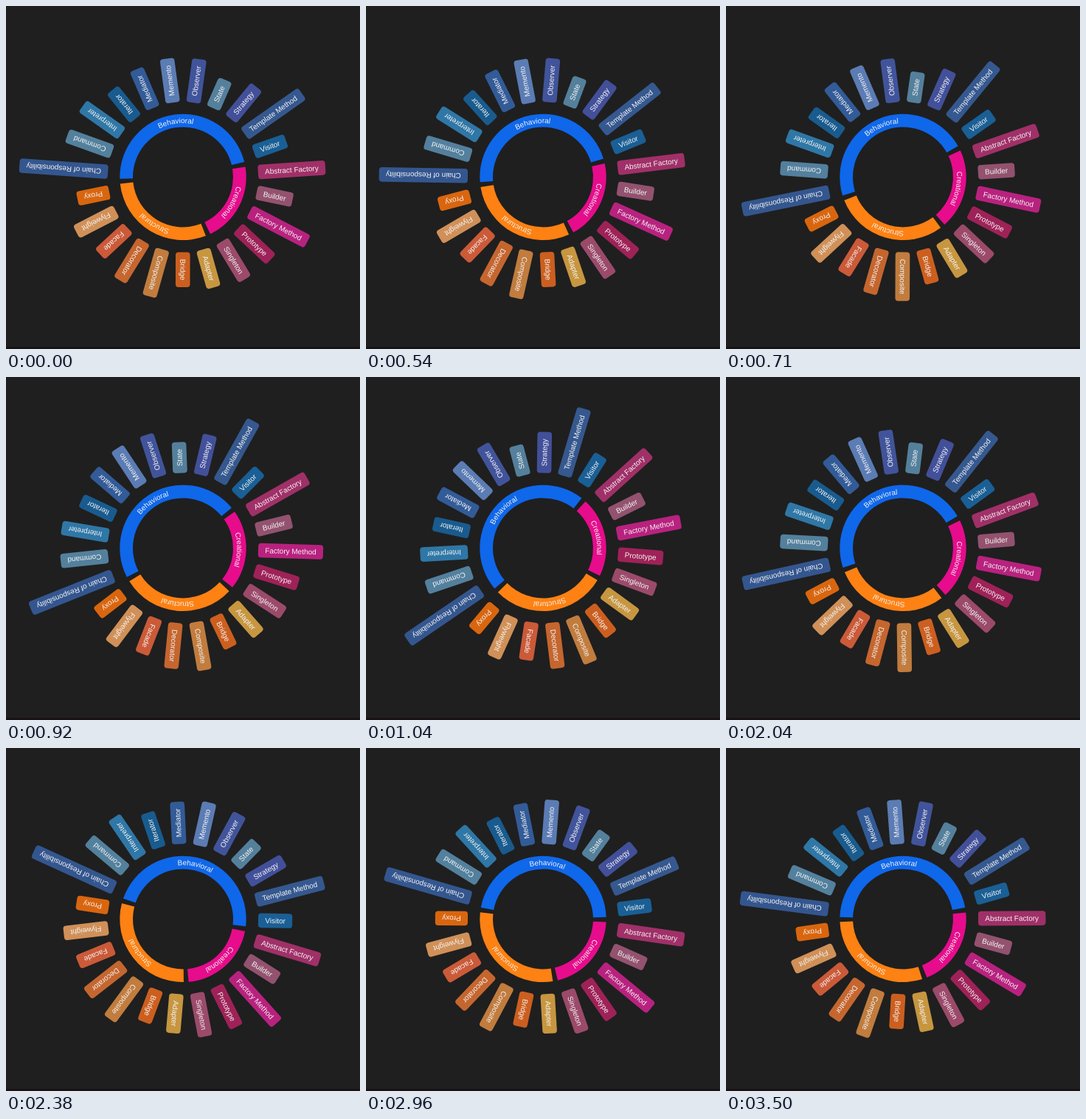
An HTML page for the animation above (4.18 s loop, 480x466 px).

```html
<!DOCTYPE html>
<html lang="en">
<head>
<meta charset="utf-8">
<title>Design pattern wheel</title>
<style>
  html, body { margin: 0; width: 100%; height: 100%; overflow: hidden; background: #1f1f1f; }
  svg { display: block; width: 480px; height: 466px; }
  text { font: 10px "Liberation Sans", Arial, sans-serif; fill: #f4f4f4; }
</style>
</head>
<body>
<svg viewBox="0 0 480 466">
  <rect width="480" height="466" fill="#1f1f1f"/>
  <rect y="463" width="480" height="3" fill="#191315"/>
  <g id="wheel"></g>
</svg>
<script>
const LOOP = 4180;
const CENTER = { x: 240, y: 232.4 };
const RING = { inner: 68, outer: 85.7, label: 73.3, gap: 4.5 };
const CARD = { start: 102, height: 19.6, padding: 9.3, radius: 4 };

const groups = [
  { name: 'Creational', color: '#e60c8c', items: [
    ['Abstract Factory', '#a03068'], ['Builder', '#93526f'], ['Factory Method', '#b8227f'],
    ['Prototype', '#9e2258'], ['Singleton', '#9b4a6a']] },
  { name: 'Structural', color: '#fd8113', items: [
    ['Adapter', '#c79640'], ['Bridge', '#cc5f1f'], ['Composite', '#c17c3e'], ['Decorator', '#c5662f'],
    ['Facade', '#cb5a38'], ['Flyweight', '#d09058'], ['Proxy', '#d9660f']] },
  { name: 'Behavioral', color: '#0f67ea', items: [
    ['Chain of Responsibility', '#34568f'], ['Command', '#53809d'], ['Interpreter', '#2f77a6'],
    ['Iterator', '#195b8e'], ['Mediator', '#325b98'], ['Memento', '#5b7cb4'], ['Observer', '#41549b'],
    ['State', '#54809c'], ['Strategy', '#42509a'], ['Template Method', '#35588f'], ['Visitor', '#1a5f95']] }
];

const wheel = document.getElementById('wheel');
const count = groups.reduce((sum, group) => sum + group.items.length, 0);
const slot = 360 / count;

function add(parent, tag, attrs, content) {
  const node = document.createElementNS('http://www.w3.org/2000/svg', tag);
  for (const key in attrs) node.setAttribute(key, attrs[key]);
  if (content) node.textContent = content;
  return parent.appendChild(node);
}

function polar(radius, degrees) {
  const a = degrees * Math.PI / 180;
  return `${(radius * Math.cos(a)).toFixed(3)} ${(radius * Math.sin(a)).toFixed(3)}`;
}

function arc(radius, from, to) {
  return `${polar(radius, from)}A${radius} ${radius} 0 0 ${to > from ? 1 : 0} ${polar(radius, to)}`;
}

function addSegment(group, from, to) {
  const a = from + RING.gap / 2, b = to - RING.gap / 2;
  add(wheel, 'path', {
    d: `M${arc(RING.outer, a, b)}L${arc(RING.inner, b, a)}Z`, fill: group.color
  });
  const id = 'arc-' + group.name;
  add(wheel, 'path', { id, d: 'M' + arc(RING.label, a, b), fill: 'none' });
  const label = add(wheel, 'text', { 'text-anchor': 'middle' });
  add(label, 'textPath', { href: '#' + id, startOffset: '50%' }, group.name);
}

function addCard([name, color], angle) {
  const card = add(wheel, 'g', { transform: `rotate(${angle})` });
  const box = add(card, 'rect', {
    x: CARD.start, y: -CARD.height / 2, height: CARD.height, rx: CARD.radius, fill: color
  });
  const label = add(card, 'text', { x: CARD.start + CARD.padding, y: 3.5 }, name);
  box.setAttribute('width', label.getComputedTextLength() + 2 * CARD.padding);
}

let index = 0;
for (const group of groups) {
  const first = index;
  for (const item of group.items) addCard(item, slot * index++);
  addSegment(group, slot * (first - 0.5), slot * (index - 0.5));
}

// The wheel turns in hard steps on a 24 fps clock rounded to 10 ms.
const poses = [{ time: 0, angle: -3.8 }];

function turn(firstTick, lastTick, steps, target) {
  const from = poses[poses.length - 1].angle;
  for (let i = 1; i <= steps; i++) {
    const part = steps > 1 ? (i - 1) / (steps - 1) : 0;
    const tick = Math.round(firstTick + (lastTick - firstTick) * part);
    poses.push({
      time: Math.round(tick * 100 / 24) * 10,
      angle: from + (target - from) * i / steps
    });
  }
}

turn(13, 17, 5, -19.3);
turn(18, 22, 4, -29.6);
turn(23, 25, 3, -42.2);
turn(40, 40, 1, -41.7);
turn(43, 43, 1, -29.6);
turn(47, 57, 5, 16.7);
turn(71, 71, 1, 8.3);
turn(73, 73, 1, 5.8);
turn(78, 78, 1, 2.2);
turn(84, 84, 1, -0.4);

function render(ms) {
  let pose = poses[0];
  for (const next of poses) if (next.time <= ms) pose = next;
  wheel.setAttribute('transform', `translate(${CENTER.x} ${CENTER.y}) rotate(${pose.angle})`);
}

const start = performance.now();
function tick() {
  render((performance.now() - start) % LOOP);
  requestAnimationFrame(tick);
}
tick();
</script>
</body>
</html>
```
